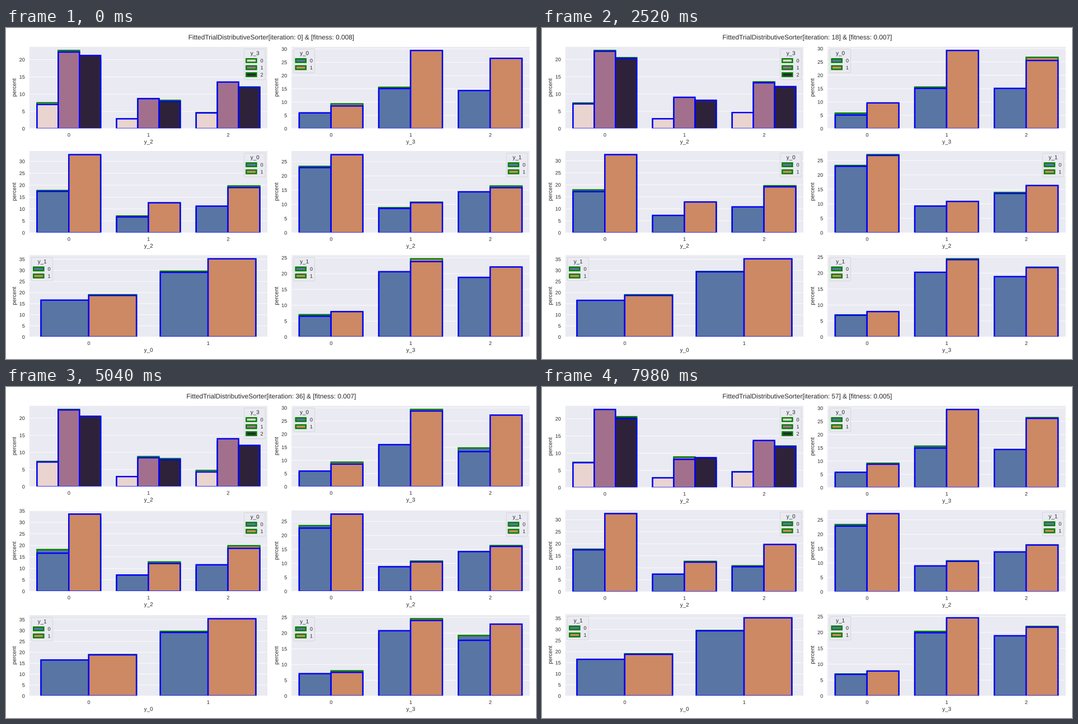
These frames come from a looping animation (947x592 px, 8 s). A matplotlib script:

```python
import numpy as np
import matplotlib.pyplot as plt
from matplotlib.animation import FuncAnimation
from matplotlib.collections import PolyCollection
from matplotlib.patches import PathPatch
from matplotlib.path import Path
from matplotlib.textpath import TextPath
from matplotlib.transforms import Affine2D

W, H, DPI = 947, 592, 64
PX = 72 / DPI                 # points per pixel
TICK_MS, STEP_MS, LOOP_MS = 40, 140, 8000

INK, PANEL_BG = "#262626", "#eaeaf2"
FRAME_FILL, FRAME_EDGE = (0.918, 0.918, 0.949, 0.8), (0.8, 0.8, 0.8, 0.8)
TRAIN, TEST = "green", "blue"
PAIR = ["#5975a4", "#cc8963"]
TRIPLE = ["#e9d4cf", "#a2708d", "#2d223a"]
BAR_LW = 2.47
TITLE_SIZE, LABEL_SIZE, TICK_SIZE = 11.84, 9.86, 9.04

TOP, BOTTOM, PANEL_W = 33.2, 552.6, 426.5
COLUMNS = (41.2, 509.7)

# x variable, hue variable, categories, hue colours, legend on the left
PANELS = [
    ("y_2", "y_3", 3, TRIPLE, False),
    ("y_3", "y_0", 3, PAIR, True),
    ("y_2", "y_0", 3, PAIR, False),
    ("y_2", "y_1", 3, PAIR, False),
    ("y_0", "y_1", 2, PAIR, True),
    ("y_3", "y_1", 3, PAIR, True),
]
CUTS = np.cumsum([n * len(colors) for _, _, n, colors, _ in PANELS])[:-1]

# percentages of the whole data set, panel by panel
WHOLE = np.array([
    7.32, 22.5, 20.43, 2.83, 8.67, 8.1, 4.6, 13.42, 12.04,
    5.57, 9.08, 15.42, 29.2, 14.28, 26.33,
    17.63, 32.48, 6.92, 12.55, 10.68, 19.45,
    23.18, 26.93, 8.73, 10.7, 13.83, 16.24,
    16.37, 18.9, 29.45, 35.07,
    6.87, 7.83, 20.18, 24.38, 18.73, 21.81,
])

plt.rcParams["font.family"] = "Liberation Sans"
fig = plt.figure(figsize=(W / DPI, H / DPI), dpi=DPI, facecolor="white")
ax = fig.add_axes([0, 0, 1, 1])
ax.set_xlim(0, W)
ax.set_ylim(H, 0)
ax.axis("off")


def text(s, x, y, size, align=0.5, angle=0):
    """Outline of s with its baseline at (x, y); align 0 left, 1 right."""
    path = TextPath((0, 0), s, size=size)
    shift = -align * path.get_extents().x1
    place = Affine2D().translate(shift, 0).rotate_deg(angle)
    return place.scale(1, -1).translate(x, y).transform_path(path)


class Scene:
    """All shapes and words of one split, shown or hidden together."""

    def __init__(self, start, fitness, panel_h, *test):
        self.start, self.fitness = start, fitness
        self.shapes, self.words = [], []
        test = np.array(test)
        # the training part is twice the test part, so it leans the other way
        train = WHOLE + 0.5 * (WHOLE - test)
        pitch = (BOTTOM - TOP - panel_h) / 2
        parts = zip(PANELS, np.split(train, CUTS), np.split(test, CUTS))
        for i, (spec, a, b) in enumerate(parts):
            top = TOP + pitch * (i // 2)
            self.panel(COLUMNS[i % 2], top, top + panel_h, spec, a, b)

        verts, faces, edges, widths = zip(*self.shapes)
        rects = PolyCollection(verts, facecolors=faces, edgecolors=edges,
                               linewidths=widths, joinstyle="miter")
        rects.set_snap(False)
        words = PathPatch(Path.make_compound_path(*self.words), fc=INK, lw=0)
        self.artists = [ax.add_collection(rects, autolim=False),
                        ax.add_patch(words)]
        self.show(False)

    def rect(self, x0, y0, x1, y1, face, edge="none", lw=0, cut=0):
        verts = [(x0 + cut, y0), (x1 - cut, y0), (x1, y0 + cut), (x1, y1 - cut),
                 (x1 - cut, y1), (x0 + cut, y1), (x0, y1 - cut), (x0, y0 + cut)]
        if not cut:
            verts = [(x0, y0), (x1, y0), (x1, y1), (x0, y1)]
        self.shapes.append((verts, face, edge, lw * PX))

    def write(self, *args, **kw):
        self.words.append(text(*args, **kw))

    def panel(self, x0, top, bottom, spec, train, test):
        name, hue, n, colors, left = spec
        x1, height = x0 + PANEL_W, bottom - top
        unit = height / (1.05 * max(train.max(), test.max()))
        self.rect(x0, top, x1, bottom, PANEL_BG)

        for t in np.arange(0, height / unit, 5):
            y = bottom - t * unit
            self.rect(x0, y - 0.41, x1, y + 0.41, "white")
            self.write(f"{t:.0f}", x0 - 7.8, y + 3.25, TICK_SIZE, align=1)

        slot, m = PANEL_W / n, len(colors)
        bar_w = 0.8 * slot / m
        for values, edge in ((train, TRAIN), (test, TEST)):
            for k, v in enumerate(values):
                x = x0 + slot * (k // m + 0.1) + bar_w * (k % m)
                self.rect(x, bottom - v * unit, x + bar_w, bottom,
                          colors[k % m], edge, BAR_LW)
        # hide the outlines below the baseline, then the white border
        self.rect(x0, bottom, x1, bottom + 3, "white")
        self.rect(x0, top, x1, bottom, "none", "white", 1.03)

        for k in range(n):
            self.write(str(k), x0 + slot * (k + 0.5), bottom + 14.3, TICK_SIZE)
        self.write(name, x0 + PANEL_W / 2, bottom + 26.6, LABEL_SIZE)
        self.write("percent", x0 - 23.3, (top + bottom) / 2, LABEL_SIZE, angle=90)
        self.legend(x0 + 4.4 if left else x1 - 42, top, hue, colors)

    def legend(self, x, top, title, colors):
        rows = [top + 25.1 + 12.6 * k for k in range(len(colors))]
        self.rect(x, top + 4.4, x + 37.6, rows[-1] + 9,
                  FRAME_FILL, FRAME_EDGE, 0.82, cut=0.9)
        self.write(title, x + 18.8, top + 15.1, LABEL_SIZE)
        for k, (y, color) in enumerate(zip(rows, colors)):
            self.rect(x + 3.6, y - 3.15, x + 21.7, y + 3.15, color, TRAIN, BAR_LW)
            self.write(str(k), x + 28.9, y + 3.2, TICK_SIZE, align=0)

    def show(self, on):
        for artist in self.artists:
            artist.set_visible(on)


# first iteration, fitness, panel height, test percentages
scenes = [
    Scene(0, 0.008, 146.8,
          7.0, 22.2, 21.2, 2.85, 8.7, 7.9, 4.55, 13.5, 11.95,
          5.95, 8.55, 15.1, 29.45, 14.35, 26.5,
          17.4, 32.8, 6.65, 12.6, 11.2, 19.0,
          22.9, 27.45, 8.55, 10.6, 14.4, 15.85,
          16.6, 18.7, 29.1, 35.2,
          6.55, 8.0, 20.6, 23.8, 18.8, 22.1),
    Scene(8, 0.007, 146.8,
          7.15, 22.35, 20.3, 2.85, 9.05, 8.2, 4.65, 13.25, 12.15,
          5.1, 9.65, 15.1, 29.3, 15.1, 25.55,
          17.15, 32.55, 7.25, 12.85, 10.8, 19.15,
          23.0, 26.75, 9.25, 10.85, 13.6, 16.35,
          16.5, 18.7, 29.35, 35.2,
          6.8, 7.95, 20.25, 24.2, 18.9, 21.75),
    Scene(30, 0.007, 145.1,
          7.2, 22.4, 20.55, 2.95, 8.45, 7.9, 4.3, 14.0, 12.05,
          5.95, 8.6, 16.0, 28.8, 13.35, 27.25,
          16.6, 33.6, 7.1, 12.1, 11.55, 18.7,
          22.6, 27.6, 8.8, 10.5, 14.2, 16.05,
          16.5, 18.85, 29.1, 35.4,
          7.1, 7.5, 20.75, 24.0, 17.7, 22.85),
    Scene(38, 0.006, 146.8,
          7.5, 22.5, 20.3, 2.75, 8.65, 8.0, 4.9, 13.15, 12.35,
          5.8, 9.4, 15.4, 28.95, 14.15, 26.5,
          17.45, 32.6, 6.9, 12.55, 10.8, 19.52,
          23.5, 26.45, 8.2, 11.1, 14.0, 16.4,
          16.1, 19.3, 29.9, 34.8,
          6.95, 8.2, 20.1, 24.1, 18.75, 21.8),
    Scene(52, 0.005, 146.8,
          7.25, 22.7, 20.1, 2.85, 8.2, 8.7, 4.57, 13.7, 11.95,
          5.8, 8.85, 14.95, 29.5, 14.4, 26.15,
          17.45, 32.5, 7.35, 12.35, 10.43, 19.7,
          22.83, 27.15, 9.0, 10.6, 13.85, 16.25,
          16.5, 18.75, 29.35, 35.2,
          6.8, 7.85, 19.9, 24.6, 18.95, 21.65),
]
title = ax.add_patch(PathPatch(Path([(0, 0)]), fc=INK, lw=0))


def update(i):
    step = (i * TICK_MS + TICK_MS // 2) // STEP_MS
    current = [s for s in scenes if s.start <= step][-1]
    for s in scenes:
        s.show(s is current)
    title.set_path(text(
        f"FittedTrialDistributiveSorter[iteration: {step}] & "
        f"[fitness: {current.fitness:.3f}]", W / 2, 20.5, TITLE_SIZE))
    return []


anim = FuncAnimation(fig, update, frames=LOOP_MS // TICK_MS, interval=TICK_MS,
                     repeat=True, repeat_delay=0, blit=False)
plt.show()
```
